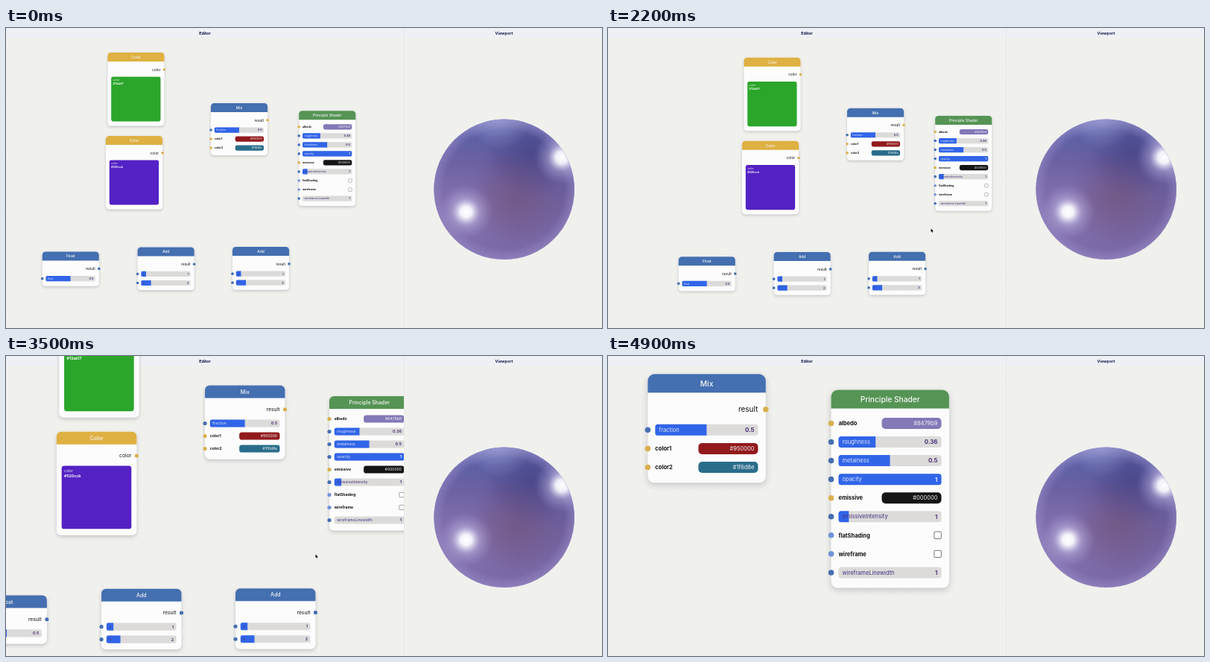
Recreate the animation shown at these times as an HTML page with a canvas. Size 800 by 403 pixels, loop 5000 ms.

```html
<!DOCTYPE html>
<html lang="en">
<head>
<meta charset="utf-8">
<title>Shader node editor</title>
<style>
html, body { margin: 0; width: 100%; height: 100%; overflow: hidden; background: #f0f0ed; }
canvas { display: block; width: 800px; height: 403px; }
</style>
</head>
<body>
<canvas id="stage"></canvas>
<script>
const W = 800, H = 403, LOOP = 5000, STEP = 100;
const SPLIT = 534.5;
const NODE_W = 158.4, NODE_SCALE = 0.4803, GRID = 12.6;
const YELLOW = '#d8b04e', BLUE = '#446fb0', GREEN = '#559455', BOOL = '#7092d8';
const INK = '#3d2070';

const canvas = document.getElementById('stage');
const ctx = canvas.getContext('2d');
const dpr = window.devicePixelRatio || 1;
canvas.width = W * dpr;
canvas.height = H * dpr;

// Row builders
const slider = (label, value, fill) => ({ type: 'slider', label, value, fill, socket: BLUE });
const swatch = (label, value, color) => ({ type: 'swatch', label, value, color, socket: YELLOW });
const check = label => ({ type: 'check', label, socket: BOOL });
const output = (label, socket) => ({ type: 'output', label, socket });
const picker = (value, color) => ({ type: 'picker', value, color });

const addRows = () => [output('result', BLUE), slider('a', '1', 0.1), slider('b', '2', 0.2)];

const nodes = [
  { title: 'Color', x: 136.4, y: 33, h: 205, head: '#dfb042',
    rows: [output('color', YELLOW), picker('#13ab17', '#2ba62b')] },
  { title: 'Color', x: 134, y: 145, h: 205, head: '#dfb042',
    rows: [output('color', YELLOW), picker('#520ccb', '#5421c4')] },
  { title: 'Mix', x: 275, y: 101, h: 146, head: BLUE,
    rows: [output('result', YELLOW), slider('fraction', '0.5', 0.5),
      swatch('color1', '#950000', '#921a1c'), swatch('color2', '#1f6d8e', '#2a6d8b')] },
  { title: 'Principle Shader', x: 393.2, y: 111.2, h: 266, head: GREEN,
    rows: [swatch('albedo', '#8479b9', '#8478b7'), slider('roughness', '0.36', 0.36),
      slider('metalness', '0.5', 0.5), slider('opacity', '1', 1),
      swatch('emissive', '#000000', '#141414'), slider('emissiveIntensity', '1', 0.1),
      check('flatShading'), check('wireframe'), slider('wireframeLinewidth', '1', 0)] },
  { title: 'Float', x: 48.7, y: 300.6, h: 96, head: BLUE,
    rows: [output('result', BLUE), slider('float', '0.5', 0.5)] },
  { title: 'Add', x: 176.6, y: 294.4, h: 120, head: BLUE, rows: addRows() },
  { title: 'Add', x: 304, y: 294.1, h: 120, head: BLUE, rows: addRows() }
];

// Keyframes: [time, ...values]
const dragKeys = [[1400, 0, 0], [1500, -1.6, 0], [1700, 6, 1.5], [2000, 32, 5],
  [2200, 46, 6.7], [2400, 51, 7], [2800, 35.4, 5]];
const zoomKeys = [[2850, 0], [3200, 0.1536], [3800, 0.537], [4150, 0.7334]];
const lastDragKeys = [[4500, 0, 0], [4600, -25, 16], [4800, -118, 76], [4900, -143.3, 92.5]];
const cursorKeys = [[1200, 385, 285], [1500, 371.5, 265.5], [1700, 384, 266.5], [2000, 415, 269],
  [2200, 433.5, 269.5], [2400, 430, 270], [2850, 415.5, 266.5], [4150, 415.5, 266.5], [4500, 301, 326.5]];
const ANCHOR = [415.5, 267];

function track(keys, t) {
  if (t <= keys[0][0]) return keys[0].slice(1);
  for (let i = 1; i < keys.length; i++) {
    const [a, b] = [keys[i - 1], keys[i]];
    if (t < b[0]) {
      const p = (t - a[0]) / (b[0] - a[0]);
      return a.slice(1).map((v, j) => v + (b[j + 1] - v) * p);
    }
  }
  return keys[keys.length - 1].slice(1);
}

function viewAt(t) {
  const scale = Math.exp(track(zoomKeys, t)[0]);
  const drag = track(dragKeys, t), last = track(lastDragKeys, t);
  const [x, y] = ANCHOR.map((a, i) => a + scale * (drag[i] - a) + last[i]);
  return { scale, x, y };
}

function text(str, x, y, size, weight, color, align = 'left') {
  ctx.font = `${weight} ${size}px Inter, sans-serif`;
  ctx.fillStyle = color;
  ctx.textAlign = align;
  ctx.textBaseline = 'alphabetic';
  ctx.fillText(str, x, y + size * 0.36);
}

function box(x, y, w, h, r, color) {
  ctx.beginPath();
  ctx.roundRect(x, y, w, h, r);
  ctx.fillStyle = color;
  ctx.fill();
}

function disc(x, y, r, color) {
  ctx.beginPath();
  ctx.arc(x, y, r, 0, Math.PI * 2);
  ctx.fillStyle = color;
  ctx.fill();
}

function socket(x, y, color) {
  disc(x, y, 4.2, '#f4f4f4');
  disc(x, y, 3.8, color);
}

const drawRow = {
  output(row, y) {
    text(row.label, 148, y, 10, 400, '#111', 'right');
    socket(NODE_W, y, row.socket);
  },
  slider(row, y) {
    const x = 10, w = 138, h = 15, top = y - h / 2;
    box(x, top, w, h, 3.5, '#dcdbd9');
    if (row.fill) {
      const r = row.fill === 1 ? 3.5 : [3.5, 0, 0, 3.5];
      box(x, top, w * row.fill, h, r, '#3165e8');
    }
    text(row.label, 15, y, 7.5, 400, row.fill > 0.3 ? '#dbe4fb' : '#4b3185');
    text(row.value, 143, y, 8, 600, row.fill === 1 ? '#fff' : INK, 'right');
    socket(0, y, row.socket);
  },
  swatch(row, y) {
    text(row.label, 10, y, 7.5, 700, '#111');
    box(68, y - 7.5, 80, 15, 5, row.color);
    text(row.value, 143, y, 7.5, 400, '#f4f4f8', 'right');
    socket(0, y, row.socket);
  },
  check(row, y) {
    text(row.label, 10, y, 7.5, 700, '#111');
    ctx.beginPath();
    ctx.roundRect(138.4, y - 4.7, 9.4, 9.4, 1.5);
    ctx.fillStyle = '#fff';
    ctx.fill();
    ctx.lineWidth = 1;
    ctx.strokeStyle = '#77777a';
    ctx.stroke();
    socket(0, y, row.socket);
  },
  picker(row) {
    box(10, 67.5, 138, 125, 5, row.color);
    text('color', 15, 77, 7.5, 400, '#f0f0f4');
    text(row.value, 15, 87.5, 7.5, 700, '#fff');
  }
};

function drawNode(node, scale) {
  ctx.save();
  ctx.translate(node.x, node.y);
  ctx.scale(NODE_SCALE, NODE_SCALE);
  ctx.save();
  ctx.shadowColor = 'rgba(40,40,60,0.22)';
  ctx.shadowBlur = 8 * NODE_SCALE * scale * dpr;
  ctx.shadowOffsetY = 3 * NODE_SCALE * scale * dpr;
  box(0, 0, NODE_W, node.h, 9, '#fcfcfc');
  ctx.restore();
  box(0, 0, NODE_W, 25, [9, 9, 0, 0], node.head);
  text(node.title, NODE_W / 2, 12.7, 10.2, 500, '#f8f8f8', 'center');
  // Output rows sit a little lower than input rows.
  const first = node.rows[0].type === 'output' ? 47.5 : 45;
  node.rows.forEach((row, i) => {
    const y = i && first > 45 ? 50 + 25.05 * i : first + 25.05 * i;
    drawRow[row.type](row, y);
  });
  ctx.restore();
}

function drawGrid({ scale, x, y }) {
  const gap = GRID * scale;
  const start = o => ((o + 2 * scale) % gap + gap) % gap;
  const size = 0.45 + 0.25 * scale;
  ctx.fillStyle = '#d3d3d0';
  for (let gx = start(x); gx < SPLIT; gx += gap)
    for (let gy = start(y); gy < H; gy += gap)
      if (gy > 13) ctx.fillRect(gx - size / 2, gy - size / 2, size, size);
}

function glow(x, y, r, stops) {
  const g = ctx.createRadialGradient(x, y, 0, x, y, r);
  stops.forEach(([at, color]) => g.addColorStop(at, color));
  ctx.fillStyle = g;
  ctx.fillRect(570, 118, 200, 200);
}

function drawSphere() {
  const cx = 668.7, cy = 216.8, r = 94.3;
  ctx.save();
  ctx.beginPath();
  ctx.arc(cx, cy, r, 0, Math.PI * 2);
  ctx.clip();
  const base = ctx.createLinearGradient(0, cy - r, 0, cy + r);
  base.addColorStop(0, '#7678b8');
  base.addColorStop(0.13, '#5d5fa6');
  base.addColorStop(0.32, '#62589a');
  base.addColorStop(0.6, '#705f9a');
  base.addColorStop(1, '#7d6ba8');
  ctx.fillStyle = base;
  ctx.fillRect(570, 118, 200, 200);
  glow(605, 235, 90, [[0, 'rgba(146,126,190,0.62)'], [1, 'rgba(146,126,190,0)']]);
  glow(705, 165, 62, [[0, 'rgba(58,54,120,0.5)'], [1, 'rgba(58,54,120,0)']]);
  glow(680, 228, 60, [[0, 'rgba(118,82,116,0.5)'], [1, 'rgba(118,82,116,0)']]);
  glow(cx, cy, r, [[0.85, 'rgba(160,150,210,0)'], [1, 'rgba(160,150,210,0.45)']]);
  glow(662, 122, 42, [[0, 'rgba(165,172,222,0.5)'], [1, 'rgba(165,172,222,0)']]);
  glow(617.5, 247, 37, [[0, '#fff'], [0.2, 'rgba(250,250,255,0.95)'],
    [0.5, 'rgba(205,198,235,0.42)'], [1, 'rgba(170,155,215,0)']]);
  glow(746, 174, 37, [[0, '#fff'], [0.22, 'rgba(250,250,255,0.92)'],
    [0.5, 'rgba(205,200,238,0.42)'], [1, 'rgba(165,155,215,0)']]);
  ctx.restore();
}

function drawCursor(x, y) {
  ctx.save();
  ctx.translate(x, y);
  ctx.beginPath();
  [[0, 0], [0, 4.6], [1.1, 3.7], [1.9, 5.4], [2.6, 5], [1.9, 3.4], [3.3, 3.3]]
    .forEach(p => ctx.lineTo(...p));
  ctx.closePath();
  ctx.lineWidth = 0.8;
  ctx.strokeStyle = '#fff';
  ctx.stroke();
  ctx.fillStyle = '#000';
  ctx.fill();
  ctx.restore();
}

function heading(str, x) {
  text(str, x, 6.7, 5.4, 700, '#1c2450', 'center');
}

function draw(t) {
  const view = viewAt(t);
  ctx.setTransform(dpr, 0, 0, dpr, 0, 0);
  ctx.fillStyle = '#f0f0ed';
  ctx.fillRect(0, 0, W, H);
  drawGrid(view);
  ctx.fillStyle = '#eef0f5';
  ctx.fillRect(0, 0, W, 13);
  heading('Editor', 267);
  heading('Viewport', 668.5);

  ctx.save();
  ctx.beginPath();
  ctx.rect(0, 0, SPLIT, H);
  ctx.clip();
  ctx.translate(view.x, view.y);
  ctx.scale(view.scale, view.scale);
  nodes.forEach(node => drawNode(node, view.scale));
  ctx.restore();

  ctx.globalAlpha = 0.2;
  heading('Editor', 267);
  ctx.globalAlpha = 1;
  ctx.fillStyle = '#e6e7e8';
  ctx.fillRect(SPLIT - 0.5, 0, 1, H);
  drawSphere();

  if (t >= cursorKeys[0][0]) {
    const [x, y] = track(cursorKeys, t), [dx, dy] = track(lastDragKeys, t);
    drawCursor(x + dx, y + dy);
  }
}

const began = performance.now();
function frame() {
  const t = (performance.now() - began) % LOOP;
  draw(Math.floor(t / STEP) * STEP);
  requestAnimationFrame(frame);
}
frame();
</script>
</body>
</html>
```
